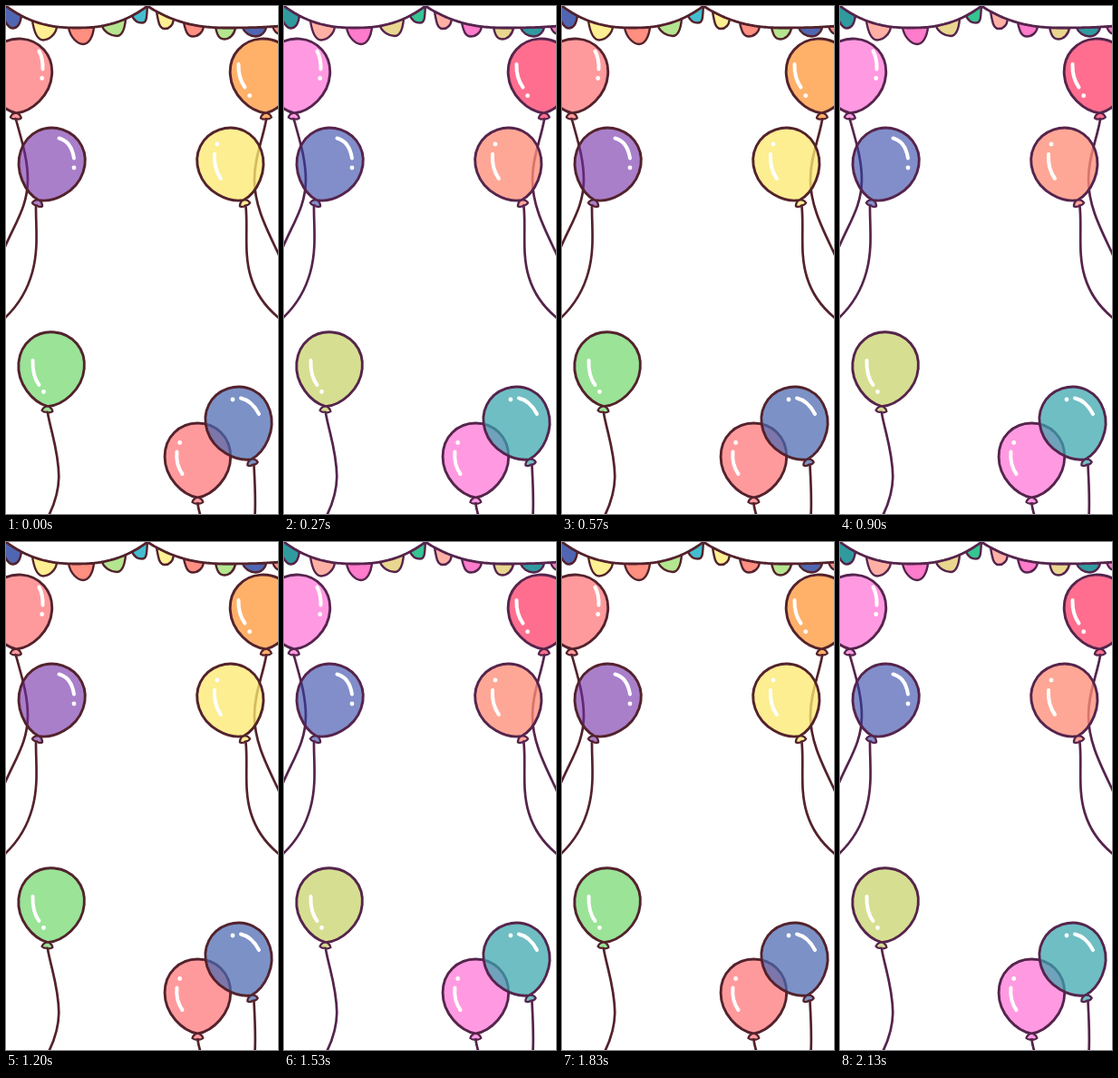
These frames come from a looping animation (300 px wide and 559 px high, 2.4 s). An HTML page with a canvas:

```html
<!DOCTYPE html>
<html lang="en">
<head>
<meta charset="utf-8">
<title>Party balloons</title>
<style>
html, body { margin: 0; width: 100%; height: 100%; overflow: hidden; background: #fff; }
canvas { display: block; width: 300px; height: 559px; }
</style>
</head>
<body>
<canvas id="stage"></canvas>
<script>
const W = 300, H = 559, LOOP = 2400;
const SWITCHES = [270, 570, 900, 1200, 1530, 1830, 2130];
const canvas = document.getElementById('stage');
const ctx = canvas.getContext('2d');
const ratio = window.devicePixelRatio || 1;
canvas.width = Math.round(W * ratio);
canvas.height = Math.round(H * ratio);

const themes = [
  {
    ink: '#53222c',
    balloons: { rose: '#ff9a9c', violet: '#a97fca', orange: '#ffb069', yellow: '#fdee91', green: '#9ae397', blue: '#7d92c6' },
    flags: { blue: '#5066b2', yellow: '#fdef92', rose: '#ff8f80', green: '#b3e68f', cyan: '#45bdd0' }
  },
  {
    ink: '#55244c',
    balloons: { rose: '#ff9ae2', violet: '#828fca', orange: '#ff6e8e', yellow: '#ffa796', green: '#d6df91', blue: '#70bec4' },
    flags: { blue: '#309a9f', yellow: '#ffb0a4', rose: '#ff7bcb', green: '#e9d68f', cyan: '#35c592' }
  }
];

// center, tip, opacity, string points, highlight curve, highlight dot
const balloons = [
  { hue: 'rose', at: [14.2, 76], tip: [11.2, 118], string: [11, 125, 17, 147, 24, 168, 24, 191, 24, 220, 11, 237, -2, 267], shine: [36.5, 49.5, 41, 58, 40.5, 69.5], dot: [39.7, 79.5] },
  { hue: 'orange', at: [283.7, 76], tip: [286.5, 118], string: [287, 125, 283, 148, 274, 166, 274, 191, 274, 221, 288, 246, 302, 276], shine: [256.5, 64, 256, 79, 263.5, 89.5], dot: [268.7, 98.7] },
  { hue: 'violet', alpha: 0.6, at: [49.7, 174], tip: [36, 214], string: [33, 221, 33, 244, 36, 268, 29, 293, 23, 315, 12, 331, -2, 344], shine: [58.5, 145.5, 72, 149, 75, 167.5], dot: [75, 178] },
  { hue: 'yellow', alpha: 0.77, at: [248.3, 174], tip: [262, 214], string: [264.5, 221, 267, 245, 262, 272, 270, 298, 276, 318, 288, 333, 302, 344], shine: [230, 163, 229, 179, 237, 190], dot: [233, 152] },
  { hue: 'green', at: [49.8, 398.8], tip: [46, 440], string: [46, 448, 50, 470, 58, 490, 58.3, 518, 58, 536, 53, 549, 47, 561], shine: [29.5, 390, 29, 407, 36.5, 417], dot: [41.5, 424.5] },
  { hue: 'rose', at: [211.4, 499], tip: [211.4, 540.5], string: [211.5, 548, 212, 552, 213, 556, 214.5, 561], shine: [188.5, 490.5, 187, 504, 194.5, 515], dot: [191.7, 480.5] },
  { hue: 'blue', alpha: 0.72, at: [257.4, 459], tip: [270.5, 499], string: [273.5, 506, 274.5, 524, 275.5, 543, 274.5, 561], shine: [259, 431.5, 271, 434, 279, 449], dot: [250, 433] }
];

// hue, left and right edge on the rope, tip
const flags = [
  ['blue', -7, 17, 7.5, 24.5], ['yellow', 29, 56, 41, 37.5], ['rose', 69, 97, 85, 42],
  ['green', 106, 132, 122, 33], ['cyan', 139, 156, 150, 18.5],
  ['yellow', 166, 185, 175, 25], ['rose', 196, 218, 206, 33.5],
  ['green', 231, 253, 240.5, 36.5], ['blue', 261, 287, 275, 33.5], ['rose', 294, 314, 304, 31]
];

function ropeY(x) {
  const left = x < 156;
  const mid = left ? 78 : 245;
  const half = left ? 78 : x < mid ? 89 : 160;
  return 24 * (1 - Math.abs((x - mid) / half) ** 2.4);
}

// A translucent paint that looks like the given colour on white
function glaze(hex, alpha) {
  const parts = [1, 3, 5].map(i => {
    const v = parseInt(hex.slice(i, i + 2), 16);
    return Math.max(0, Math.round((v - 255 * (1 - alpha)) / alpha));
  });
  return `rgba(${parts}, ${alpha})`;
}

function paint(fill, width) {
  ctx.fillStyle = fill;
  ctx.fill();
  ctx.lineWidth = width;
  ctx.stroke();
}

function drawString(p) {
  ctx.beginPath();
  ctx.moveTo(p[0], p[1]);
  for (let i = 2; i < p.length; i += 6) ctx.bezierCurveTo(...p.slice(i, i + 6));
  ctx.lineWidth = 2.7;
  ctx.stroke();
}

function drawBody(fill) {
  ctx.beginPath();
  ctx.moveTo(0, 42);
  ctx.bezierCurveTo(-17, 39, -36.3, 20, -36.3, -3);
  ctx.bezierCurveTo(-36.3, -25, -20, -40, 0, -40);
  ctx.bezierCurveTo(20, -40, 36.3, -25, 36.3, -3);
  ctx.bezierCurveTo(36.3, 20, 17, 39, 0, 42);
  ctx.closePath();
  paint(fill, 2.9);
}

function drawKnot(fill) {
  ctx.beginPath();
  ctx.moveTo(-1.5, 42);
  ctx.quadraticCurveTo(-5, 43.5, -6, 47);
  ctx.quadraticCurveTo(-3, 49.5, 0, 48);
  ctx.quadraticCurveTo(3, 49.5, 6, 47);
  ctx.quadraticCurveTo(5, 43.5, 1.5, 42);
  ctx.closePath();
  paint(fill, 2.2);
}

function drawShine(curve, dot) {
  ctx.strokeStyle = ctx.fillStyle = '#fff';
  ctx.lineWidth = 4;
  ctx.beginPath();
  ctx.moveTo(curve[0], curve[1]);
  ctx.quadraticCurveTo(...curve.slice(2));
  ctx.stroke();
  ctx.beginPath();
  ctx.arc(dot[0], dot[1], 2.4, 0, Math.PI * 2);
  ctx.fill();
}

function drawBalloon(b, theme) {
  const dx = b.tip[0] - b.at[0], dy = b.tip[1] - b.at[1];
  const color = theme.balloons[b.hue];
  ctx.strokeStyle = theme.ink;
  drawString(b.string);
  ctx.save();
  ctx.translate(...b.at);
  ctx.rotate(Math.atan2(-dx, dy));
  drawBody(glaze(color, b.alpha || 1));
  drawKnot(color);
  ctx.restore();
  drawShine(b.shine, b.dot);
}

function drawFlag([hue, x0, x1, tx, ty], theme) {
  const y0 = ropeY(x0), y1 = ropeY(x1);
  ctx.beginPath();
  ctx.moveTo(x0, y0);
  ctx.bezierCurveTo(x0 + 2, y0 + (ty - y0) * 0.6, tx - 6, ty, tx, ty);
  ctx.bezierCurveTo(tx + 6, ty, x1 - 1, y1 + (ty - y1) * 0.6, x1, y1);
  ctx.closePath();
  paint(theme.flags[hue], 2.4);
}

function drawBunting(theme) {
  ctx.strokeStyle = theme.ink;
  for (const flag of flags) drawFlag(flag, theme);
  // White swag hides the straight tops of the flags
  ctx.beginPath();
  ctx.moveTo(-4, ropeY(-4));
  for (let x = -2; x <= 304; x += 2) ctx.lineTo(x, ropeY(x));
  ctx.lineTo(304, -4);
  ctx.lineTo(-4, -4);
  paint('#fff', 2.8);
}

function render(time) {
  const theme = themes[SWITCHES.filter(s => s <= time).length % 2];
  ctx.setTransform(ratio, 0, 0, ratio, 0, 0);
  ctx.fillStyle = '#fff';
  ctx.fillRect(0, 0, W, H);
  ctx.lineCap = ctx.lineJoin = 'round';
  drawBunting(theme);
  for (const b of balloons) drawBalloon(b, theme);
}

function tick() {
  render(performance.now() % LOOP);
  requestAnimationFrame(tick);
}
tick();
</script>
</body>
</html>
```
